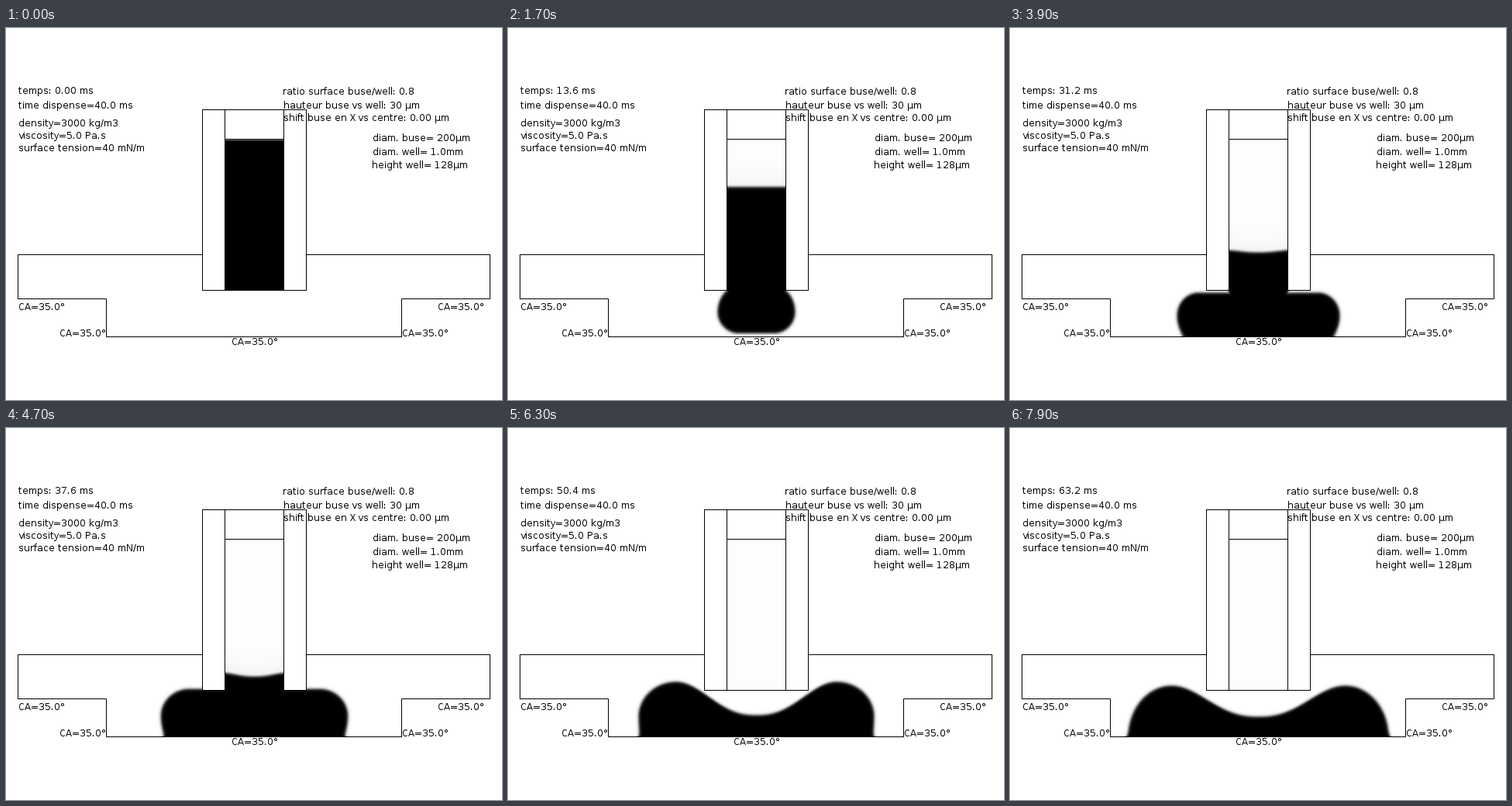
Animation, 640 px wide and 480 px high, one loop 8000 ms. Source, as a matplotlib script:

```python
import numpy as np
import matplotlib.pyplot as plt
from matplotlib.animation import FuncAnimation

W, H, DPI = 640, 480, 80
FRAMES, STEP = 80, 100
PX = 72 / DPI                       # one pixel in points
CX, FLOOR, TIP, BORE, WALL = 320, 398, 338, 38, 67

plt.rcParams.update({
    "font.family": "DejaVu Sans",
    "text.hinting": "native",
    "text.hinting_factor": 1,       # whole-pixel letter spacing
})

Y, X = np.mgrid[0:H, 0:W].astype(float)
U = np.abs(X - CX)
IN_BORE = (U <= BORE) & (Y <= TIP)
IN_WALL = (U > BORE) & (U <= WALL) & (Y <= TIP)


def keyed(t, *keys):
    """Straight-line motion through (time, value) keys."""
    return np.interp(t, *zip(*keys))


def soft(distance, width):
    return 0.5 + 0.5 * np.tanh(distance / width)


def lobe(t, top):
    """Signed distance into a stadium whose round ends creep outwards."""
    reach = keyed(t, (0, 38), (0.9, 39), (1.7, 50), (2.7, 77),
                  (3.9, 105), (6.3, 152), (7.9, 168))
    a = keyed(t, (0, 18), (0.9, 25), (1.7, 28), (3.9, 28), (5.4, 44), (7.9, 56))
    mid = keyed(t, (0, 338), (0.9, 360), (1.7, 366), (2.7, 370),
                (6.3, 372), (7.9, 398))
    below = keyed(t, (0, 0.5), (0.9, 21), (1.7, 27.5), (2.7, 29),
                  (3.9, 36), (5.4, 63), (6.3, 90))

    foot = 3 * np.exp((np.minimum(Y, FLOOR) - FLOOR) / 3)
    dx = np.maximum(U - foot - (reach - a), 0)
    dy = Y - mid
    b = np.where(dy < 0, max(mid - top, 1), below)
    q = np.hypot(dx / a, dy / b)
    slope = np.hypot(dx / a**2, dy / b**2)
    inside = (1 - q) * np.maximum(q, 0.05) / np.maximum(slope, 1e-6)
    neck = np.minimum(BORE + 1 - U, mid - Y)
    return np.maximum(inside, neck), reach - a


def liquid(t):
    """Brightness of every pixel at time t in seconds."""
    edge = 0.2 + min(2, 6 * t)
    top = keyed(t, (0, 337), (1.7, 332), (2.7, 340), (3.9, 341),
                (5.4, 332), (6.3, 327), (7.9, 332))
    inside, crest = lobe(t, top)
    body = np.where(IN_BORE, 1, soft(inside, edge))

    # free surface: falls down the bore, then sags between the two crests
    level = keyed(t, (0, 144), (1.7, 204.5), (3.9, 289), (4.8, 324),
                  (5.4, 353), (6.3, 370), (7.9, 372))
    sag = keyed(t, (2.7, 0), (4.8, 5), (5.4, level - top))
    span = keyed(t, (4.8, 42), (5.4, 60), (6.3, crest))
    bend = np.minimum(U / span, 1) ** 1.2
    depth = Y - level + sag * (1 - np.cos(np.pi * bend)) / 2
    dark = np.minimum(body, soft(depth, edge))

    haze = 0.008 + 0.05 * np.exp(np.minimum(depth, 0) / 12)
    dark = np.where(IN_BORE & (Y > 143), np.maximum(dark, haze * min(t, 1)), dark)

    # air trapped while the drop lands on the floor
    air = 0.75 * np.exp(-((t - 2.65) / 0.35)**2)
    dark *= 1 - air * np.exp(-((U - 9) / 4)**2 - ((Y - FLOOR + 1) / 3)**2)
    dark[IN_WALL | (Y > FLOOR)] = 0
    return 1 - dark


fig = plt.figure(figsize=(W / DPI, H / DPI), dpi=DPI, facecolor="white")
ax = fig.add_axes([0, 0, 1, 1])
ax.axis("off")
picture = ax.imshow(np.ones((H, W)), cmap="gray", vmin=0, vmax=1,
                    interpolation="nearest", aspect="auto")
ax.set_xlim(-0.5, W - 0.5)
ax.set_ylim(H - 0.5, -0.5)


def line(*pts):
    x, y = np.array(pts).T - 0.5    # snaps to the pixel centre
    ax.plot(x, y, color="black", lw=PX, solid_joinstyle="miter",
            solid_capstyle="projecting")


def label(x, y, s):
    return ax.text(x - 0.5, y - 0.5, s, fontsize=12 * PX, color="black",
                   va="baseline", ha="left")


line((253, 292), (15, 292), (15, 349), (129, 349), (129, 398), (510, 398),
     (510, 349), (624, 349), (624, 292), (387, 292))
line((253, 105), (387, 105), (387, 338), (253, 338), (253, 105))
for x in (CX - BORE, CX + BORE):
    line((x, 105), (x, 338))
line((282, 143), (358, 143))

clock = label(16, 85, "")
for x, y, s in [
    (16, 104, "time dispense=40.0 ms"),
    (16, 127, "density=3000 kg/m3"),
    (16, 143, "viscosity=5.0 Pa.s"),
    (16, 159, "surface tension=40 mN/m"),
    (357, 86, "ratio surface buse/well: 0.8"),
    (358, 104, "hauteur buse vs well: 30 µm"),
    (358, 120, "shift buse en X vs centre: 0.00 µm"),
    (473, 146, "diam. buse= 200µm"),
    (473, 164, "diam. well= 1.0mm"),
    (472, 181, "height well= 128µm"),
]:
    label(x, y, s)
for x, y in [(16, 364), (69, 398), (291, 409), (511, 398), (557, 364)]:
    label(x, y, "CA=35.0°")


def update(i):
    ms = 0.8 * i
    clock.set_text(f"temps: {ms:.{2 if ms < 10 else 1}f} ms")
    picture.set_data(liquid(i * STEP / 1000))
    return picture, clock


anim = FuncAnimation(fig, update, frames=FRAMES, interval=STEP,
                     repeat=True, repeat_delay=0, blit=False)
plt.show()
```
